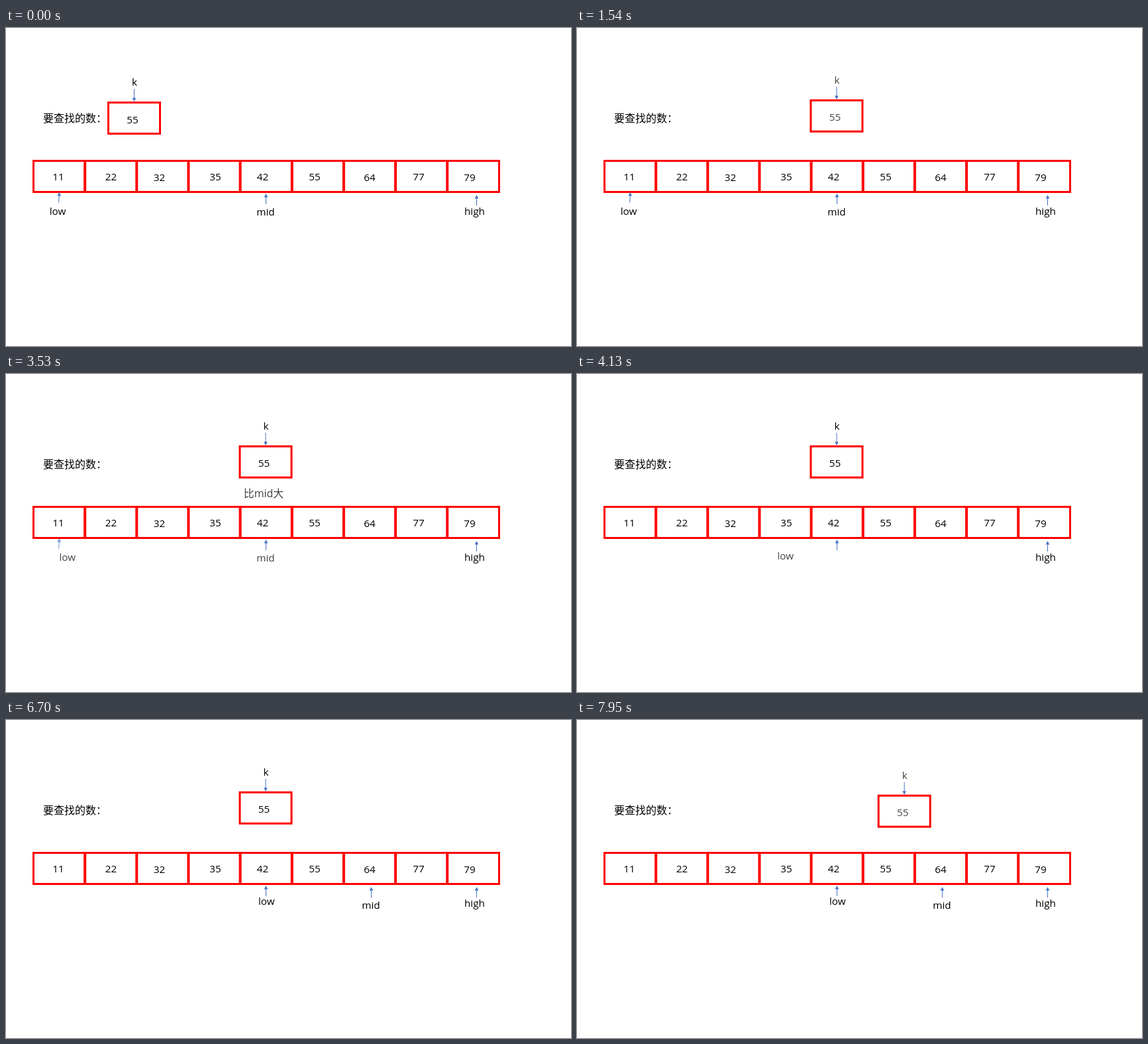
Recreate the animation shown at these times as an HTML page. Size 853 by 480 pixels, loop 8 s.

```html
<!DOCTYPE html>
<html lang="zh-CN">
<head>
<meta charset="utf-8">
<style>
  html, body { margin: 0; width: 100%; height: 100%; overflow: hidden; background: #fff; }
  svg { display: block; width: 853px; height: 480px; }
  text { font: 15.3px "Open Sans", "Noto Sans CJK SC", "Noto Sans CJK", sans-serif; text-anchor: middle; }
  .cjk { font-size: 16px; }
  .box { fill: none; stroke: #f00; stroke-width: 3; }
  .arrow line { stroke: #4472c4; stroke-width: 1; }
  .arrow path { fill: #4472c4; }
</style>
</head>
<body>
<svg id="stage" viewBox="0 0 853 480"></svg>
<script>
const stage = document.getElementById('stage');

function add(parent, name, attrs = {}, content = '') {
  const el = document.createElementNS('http://www.w3.org/2000/svg', name);
  for (const key in attrs) el.setAttribute(key, attrs[key]);
  el.textContent = content;
  return parent.appendChild(el);
}
const label = (parent, content, x, y, attrs) => add(parent, 'text', { x, y, ...attrs }, content);

// Thin vertical arrow; the head points away from the tail.
function arrow(parent, x, tail, tip, lean = 0) {
  const g = add(parent, 'g', { class: 'arrow' });
  const base = tip + 5.5 * Math.sign(tail - tip);
  add(g, 'line', { x1: x - lean, y1: tail, x2: x, y2: base });
  add(g, 'path', { d: `M${x - 2.8} ${base}H${x + 2.8}L${x} ${tip}Z` });
  return g;
}

// Array cells
label(stage, '要查找的数：', 56, 141.5, { class: 'cjk', style: 'text-anchor:start' });
const cells = [[11, 79], [22, 158.5], [32, 231.5, 1], [35, 316], [42, 387.5],
               [55, 466], [64, 549, 1], [77, 623], [79, 700, 1]];
add(stage, 'rect', { class: 'box', x: 41.5, y: 200.5, width: 703, height: 47 });
cells.forEach(([value, x, drop = 0], i) => {
  if (i) add(stage, 'path', { class: 'box', d: `M${41 + 78.15 * i} 200V248`, style: 'stroke-width:4' });
  label(stage, value, x, 230 + drop);
});

// Pointers
const lowArrow = arrow(stage, 80.3, 263.5, 248, 0.7);
const low = label(stage, 'low', 78, 282);
arrow(stage, 392.5, 266, 250);
const mid = label(stage, 'mid', 392, 283);
arrow(stage, 710.5, 268, 252);
label(stage, 'high', 707.5, 282);
const newMid = add(stage, 'g');
arrow(newMid, 551.5, 268, 252);
label(newMid, 'mid', 551, 285);
const verdict = label(stage, '比mid大', 389, 186, { class: 'cjk' });

// Search key
const key = add(stage, 'g');
label(key, 'k', 194, 87);
arrow(key, 193.5, 92, 111);
add(key, 'rect', { class: 'box', x: 154.5, y: 112.5, width: 78, height: 47 });
label(key, '55', 191, 143.5);

const STEP = 60, LOOP = 8000;

// Linear progress, advancing in fixed steps
const progress = (t, start, duration) =>
  Math.min(1, Math.max(0, Math.floor((t - start) / STEP) * STEP / duration));

// Constant speed with a short soft start and stop
function soft(p, a = 0.18) {
  if (p > 0.5) return 1 - soft(1 - p, a);
  return (p < a ? p * p / (2 * a) : p - a / 2) / (1 - a);
}
const moving = p => p > 0 && p < 1;

function place(el, x, y, isMoving) {
  el.setAttribute('transform', `translate(${x} ${y})`);
  el.setAttribute('fill', isMoving ? '#444' : '#000');
}

function draw(t) {
  const first = soft(progress(t, 340, 1210));
  const second = soft(progress(t, 7170, 1254));
  const lowMove = soft(progress(t, 3410, 1020));
  const leave = 1 - progress(t, 3410, 480);

  place(key, 198.5 * first + 157.5 * second, -3.3 * first + 7.6 * second, moving(first) || moving(second));
  place(low, 315.3 * lowMove, -3 * lowMove, moving(lowMove));
  for (const el of [lowArrow, mid]) el.setAttribute('opacity', leave);
  verdict.setAttribute('opacity', progress(t, 1540, 660) * leave);
  newMid.setAttribute('opacity', progress(t, 5860, 840));
}

const begin = performance.now();
function tick() {
  draw((performance.now() - begin) % LOOP);
  requestAnimationFrame(tick);
}
tick();
</script>
</body>
</html>
```
